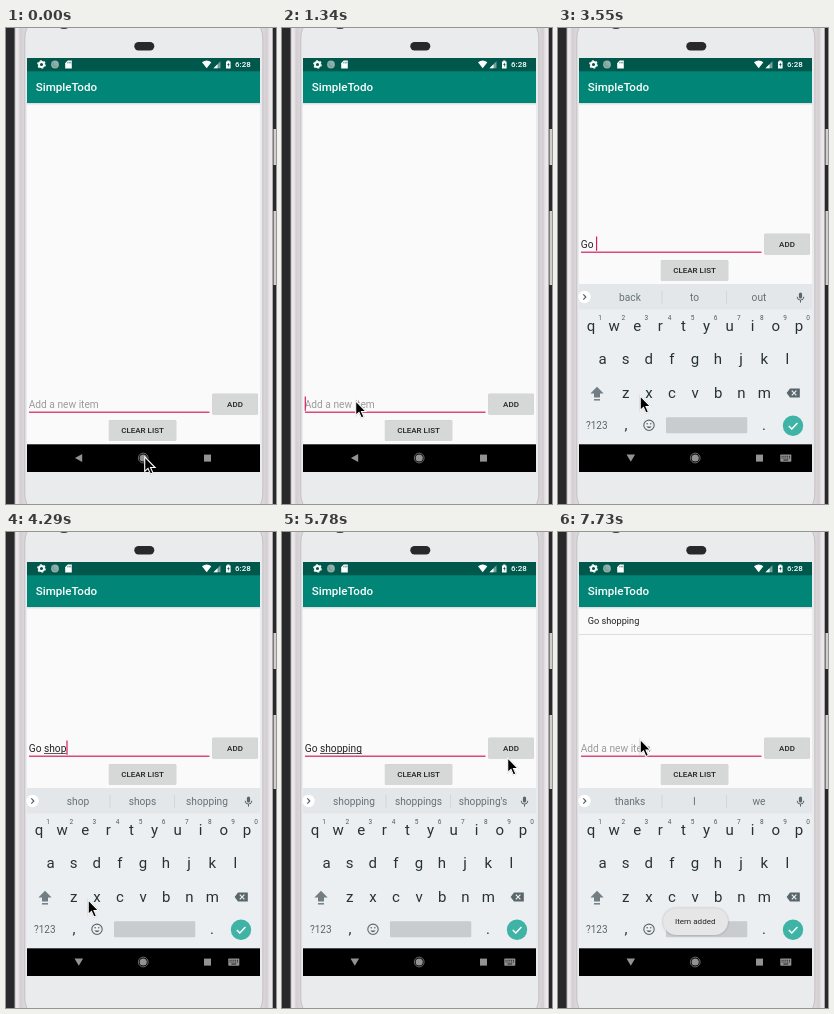
Recreate the animation shown at these times as an HTML page. Size 270 by 476 pixels, loop 8 s.

```html
<!DOCTYPE html>
<html lang="en">
<head>
<meta charset="utf-8">
<title>Todo list demo</title>
<style>
  html, body { margin: 0; width: 100%; height: 100%; overflow: hidden; background: #29282a; }
  svg { display: block; width: 100%; height: 100%; font-family: Roboto, "Noto Sans", sans-serif; }
  text { white-space: pre; }
  .mid { text-anchor: middle; }
  .field { font-size: 10.2px; fill: #222; }
  .hint { fill: #9b9b9b; }
  .button rect { fill: #d6d7d7; filter: drop-shadow(0 .6px .4px #0004); }
  .button text { font-size: 8px; font-weight: 500; fill: #212121; }
  .key { font-size: 15px; fill: #263238; }
  .digit { font-size: 6.5px; fill: #4f5b61; }
  .word { font-size: 10.2px; fill: #657177; }
  .toast rect { fill: #e6e6e6; filter: drop-shadow(0 .6px .8px #0004); }
  .toast text { font-size: 8.1px; fill: #252525; }
  #pointer { filter: drop-shadow(.4px .9px .7px #0006); }
</style>
</head>
<body>
<svg viewBox="0 0 270 476">
  <defs>
    <linearGradient id="shade" x2="0" y2="1">
      <stop stop-color="#d8d8d8"/><stop offset="1" stop-color="#fafafa"/>
    </linearGradient>
    <linearGradient id="rim">
      <stop stop-color="#8f8a8d"/><stop offset=".006" stop-color="#efecee"/>
      <stop offset=".016" stop-color="#e6e1e4"/><stop offset=".022" stop-color="#d3ced1"/>
      <stop offset=".04" stop-color="#dcd7da"/><stop offset=".96" stop-color="#dcd7da"/>
      <stop offset=".978" stop-color="#d3ced1"/><stop offset=".984" stop-color="#e6e1e4"/>
      <stop offset=".994" stop-color="#efecee"/><stop offset="1" stop-color="#8f8a8d"/>
    </linearGradient>
  </defs>

  <!-- Phone -->
  <rect width="270" height="476" fill="#29282a"/>
  <path d="M267.5 101h2.5v36h-2.5zM267.5 183h2.5v74h-2.5z" fill="#d3cdd0"/>
  <rect x="8.4" width="258.6" height="476" fill="url(#rim)"/>
  <rect x="18.8" y="-14" width="238" height="504" rx="24" fill="#e9ebed" stroke="#bdb8bb" stroke-width=".8"/>
  <ellipse cx="58" cy="-.5" rx="4" ry="1.5" fill="#3a3a3a"/>
  <rect x="128.3" y="14" width="20" height="8.5" rx="4.2" fill="#29292b"/>

  <!-- App -->
  <rect x="21" y="30" width="233" height="414" fill="#fafafa"/>
  <rect x="21" y="75" width="233" height="2.5" fill="url(#shade)"/>
  <rect x="21" y="43" width="233" height="32" fill="#008577"/>
  <rect x="21" y="30" width="233" height="13.3" fill="#00574b"/>
  <text x="29.7" y="63" font-size="11.6" font-weight="500" fill="#fff">SimpleTodo</text>

  <g fill="#fff">
    <circle cx="35.5" cy="36.5" r="2.5" fill="none" stroke="#fff" stroke-width="1.9"/>
    <circle cx="35.5" cy="36.5" r="3.7" fill="none" stroke="#fff" stroke-width="1.3" stroke-dasharray="1.9 1.975"/>
    <circle cx="49" cy="36.5" r="3.9" fill="#8fb0aa"/>
    <path d="M48 33.5a3 3 0 1 0 3.8 4.6a3.5 3.5 0 0 1-3.8-4.6z" fill="#7aa098"/>
    <path d="M61.7 32.6h4.1v7.8h-6.6v-5.3z"/>
    <path d="M61.8 33.8v1.6M63.3 33.8v1.6M64.8 33.8v1.6" stroke="#00574b" stroke-width=".6"/>
    <path d="M196 34.2Q200.7 30.8 205.4 34.2L200.7 40.2z"/>
    <path d="M207.5 40.2l7-7v7z" opacity=".45"/>
    <path d="M207.5 40.2l4-4v4z"/>
    <path d="M220 33.4h1.2v-.9h2.2v.9h1.2v7h-4.6z"/>
    <path d="M222.7 34.4l-1.6 2.7h1.1v2l1.5-2.8h-1z" fill="#00574b"/>
    <text x="229" y="39.4" font-size="8" font-weight="500">6:28</text>
  </g>

  <g id="item">
    <text x="29.7" y="92.2" font-size="9.2" fill="#212121">Go shopping</text>
    <path d="M21 102.5h233" stroke="#dedede"/>
  </g>

  <g id="form">
    <text id="hint" class="field hint" x="22.7" y="379.8">Add a new item</text>
    <text id="typed" class="field" x="22.7" y="379.8"></text>
    <rect id="compose" y="381" height=".8" fill="#333"/>
    <rect x="23" y="383.6" width="180.5" height="1.2" fill="#d81b60"/>
    <rect id="caret" y="368.5" width="1.2" height="14.3" fill="#d81b60"/>
    <g class="button mid">
      <rect x="206.4" y="365.7" width="45.4" height="20.8" rx="1"/>
      <text x="229" y="378.9">ADD</text>
      <rect x="102.9" y="392.2" width="67.3" height="20.8" rx="1"/>
      <text x="136.5" y="405.2">CLEAR LIST</text>
    </g>
  </g>

  <!-- Keyboard -->
  <g id="keyboard">
    <rect x="21" y="256" width="233" height="160" fill="#eceff1"/>
    <rect x="21" y="256" width="233" height="25.5" fill="#e3e7e9"/>
    <path d="M104 262.5v13M168.5 262.5v13" stroke="#cdd2d5" stroke-width=".8"/>
    <circle cx="26.5" cy="269" r="6.2" fill="#fff"/>
    <path d="M25.3 266.4l2.5 2.6l-2.5 2.6" fill="none" stroke="#546067" stroke-width="1.2"/>
    <g fill="none" stroke="#59666c">
      <path d="M242.5 266v3" stroke-width="3.2" stroke-linecap="round"/>
      <path d="M239.2 268.8a3.3 3.3 0 0 0 6.6 0M242.5 272v2.6"/>
    </g>
    <g id="words" class="mid"></g>
    <g id="keys" class="mid"></g>
    <path d="M39 358.8l6.6 6.7h-3.6v4h-6v-4h-3.6z" fill="#737e84"/>
    <path d="M36 371.8h6" stroke="#737e84" stroke-width="1.5"/>
    <path d="M232 360.5h9.8v9h-9.8l-3.4-4.5z" fill="#59666c"/>
    <path d="M233.8 362.7l4.6 4.6m0-4.6l-4.6 4.6" stroke="#eceff1" stroke-width="1.2"/>
    <text x="28" y="401" font-size="10" fill="#59666c">?123</text>
    <circle cx="91" cy="397.3" r="5.2" fill="none" stroke="#59666c" stroke-width="1.1"/>
    <path d="M88.3 398.6q2.7 3.4 5.4 0z" fill="#59666c"/>
    <circle cx="89.2" cy="395.8" r=".8" fill="#59666c"/>
    <circle cx="92.8" cy="395.8" r=".8" fill="#59666c"/>
    <rect x="108" y="389.3" width="81.3" height="16" rx="1.2" fill="#c8cccf"/>
    <circle cx="235" cy="397.8" r="10.2" fill="#3fb3a5"/>
    <path d="M230.8 398l3 3l5.6-5.9" fill="none" stroke="#fff" stroke-width="1.4"/>
  </g>

  <g id="toast" class="toast mid">
    <rect x="105" y="376.3" width="65" height="26.6" rx="13.3"/>
    <text x="137.3" y="392.3">Item added</text>
  </g>

  <!-- Navigation bar -->
  <rect x="21" y="416.3" width="233" height="27.7" fill="#000"/>
  <g fill="#939393">
    <path id="back"/>
    <circle cx="137.2" cy="430" r="4.9" fill="none" stroke="#777" stroke-width=".9"/>
    <circle cx="137.2" cy="430" r="3.6"/>
    <rect x="198" y="426.6" width="7" height="7"/>
    <g id="switcher">
      <rect x="222.3" y="426.5" width="11" height="7.2" rx=".8"/>
      <path d="M223.6 428.3h8.4M223.6 430h8.4" stroke="#000" stroke-width=".8" stroke-dasharray="1 .85"/>
      <path d="M225.4 432h4.8" stroke="#000" stroke-width=".8"/>
    </g>
  </g>

  <path id="pointer" d="M.7.9v14.6l3.3-3.1l2.4 5.5l2.5-1.1l-2.4-5.3h4.6z" fill="#000" stroke="#fff" stroke-width="1.1"/>
</svg>
<script>
const $ = id => document.getElementById(id);
const LOOP = 8000, FIELD_X = 22.7;

function addText(parent, x, y, cls, content) {
  const el = document.createElementNS('http://www.w3.org/2000/svg', 'text');
  el.setAttribute('x', x);
  el.setAttribute('y', y);
  el.setAttribute('class', cls);
  el.textContent = content;
  return $(parent).appendChild(el);
}

[['qwertyuiop', 33, 303.4], ['asdfghjkl', 44.5, 336.4], ['zxcvbnm', 67.8, 369.8]].forEach(([row, x, y], r) =>
  [...row].forEach((letter, i) => {
    addText('keys', x + i * 23.1, y, 'key', letter);
    if (!r) addText('keys', x + 9.2 + i * 23.1, 292, 'digit', (i + 1) % 10);
  }));
addText('keys', 68, 401.5, 'key', ',');
addText('keys', 206, 401.5, 'key', '.');
const words = [72, 136.5, 201].map(x => addText('words', x, 273, 'word', ''));

// Each step lists only what changes at that moment (ms).
const steps = [
  [0, { at: [138, 428], caret: 0, text: '', words: '', keyboard: 0, item: 0, toast: 0 }],
  [150, { at: [137, 429], caret: 1 }],
  [600, { caret: 0 }],
  [1050, { at: [131, 423], caret: 1 }],
  [1190, { at: [94, 389] }],
  [1340, { at: [73, 372] }],
  [1640, { caret: 0 }],
  [2080, { caret: 1 }],
  [2520, { caret: 0 }],
  [3120, { caret: 1 }],
  [3550, { at: [81.5, 367], keyboard: 1, text: 'Go ', words: 'back to out' }],
  [3690, { text: 'Go s', words: 'so see some' }],
  [3840, { text: 'Go sh', words: 'she should show' }],
  [3990, { text: 'Go sho', words: 'show should shop' }],
  [4290, { text: 'Go shop', words: 'shop shops shopping' }],
  [4430, { text: 'Go shopp', words: 'shopp shopping shopped' }],
  [4730, { text: 'Go shoppin', words: 'shoppin shopping shoppin\'' }],
  [4880, { text: 'Go shopping', words: 'shopping shoppings shopping\'s' }],
  [5330, { at: [98, 352], caret: 0 }],
  [5480, { at: [150, 302] }],
  [5630, { at: [205, 246] }],
  [5780, { at: [225, 225] }],
  [5930, { at: [235, 217], caret: 1 }],
  [6230, { text: '', item: 1, words: 'thanks I we' }],
  [6380, { toast: .6 }],
  [6530, { toast: 1 }],
  [6680, { at: [212, 217] }],
  [6830, { at: [136, 221], caret: 0 }],
  [7280, { at: [94, 210], caret: 1 }],
  [7430, { at: [81.5, 206.5] }],
  [7730, { caret: 0 }]
];

function draw(time) {
  const s = Object.assign({}, ...steps.filter(([start]) => start <= time).map(([, change]) => change));
  const show = (id, on) => $(id).setAttribute('opacity', +on);
  const typed = $('typed');
  typed.textContent = s.text;
  const end = s.text ? typed.getSubStringLength(0, s.text.length) : 0;
  const start = s.text ? typed.getSubStringLength(0, 3) : 0;

  $('compose').setAttribute('x', FIELD_X + start);
  $('compose').setAttribute('width', Math.max(0, end - start));
  $('caret').setAttribute('x', FIELD_X + end);
  show('caret', s.caret);
  show('hint', !s.text);
  show('item', s.item);
  show('toast', s.toast);
  show('keyboard', s.keyboard);
  show('switcher', s.keyboard);
  $('form').setAttribute('transform', `translate(0 ${s.keyboard ? -160 : 0})`);
  $('back').setAttribute('d', s.keyboard ? 'M68.5 426.5h8.6l-4.3 7.3z' : 'M76.2 426v8l-7.3-4z');
  $('pointer').setAttribute('transform', `translate(${s.at})`);
  const list = s.words.split(' ');
  words.forEach((el, i) => el.textContent = list[i] || '');
}

const origin = performance.now();
function tick() {
  draw((performance.now() - origin) % LOOP);
  requestAnimationFrame(tick);
}
tick();
</script>
</body>
</html>
```
